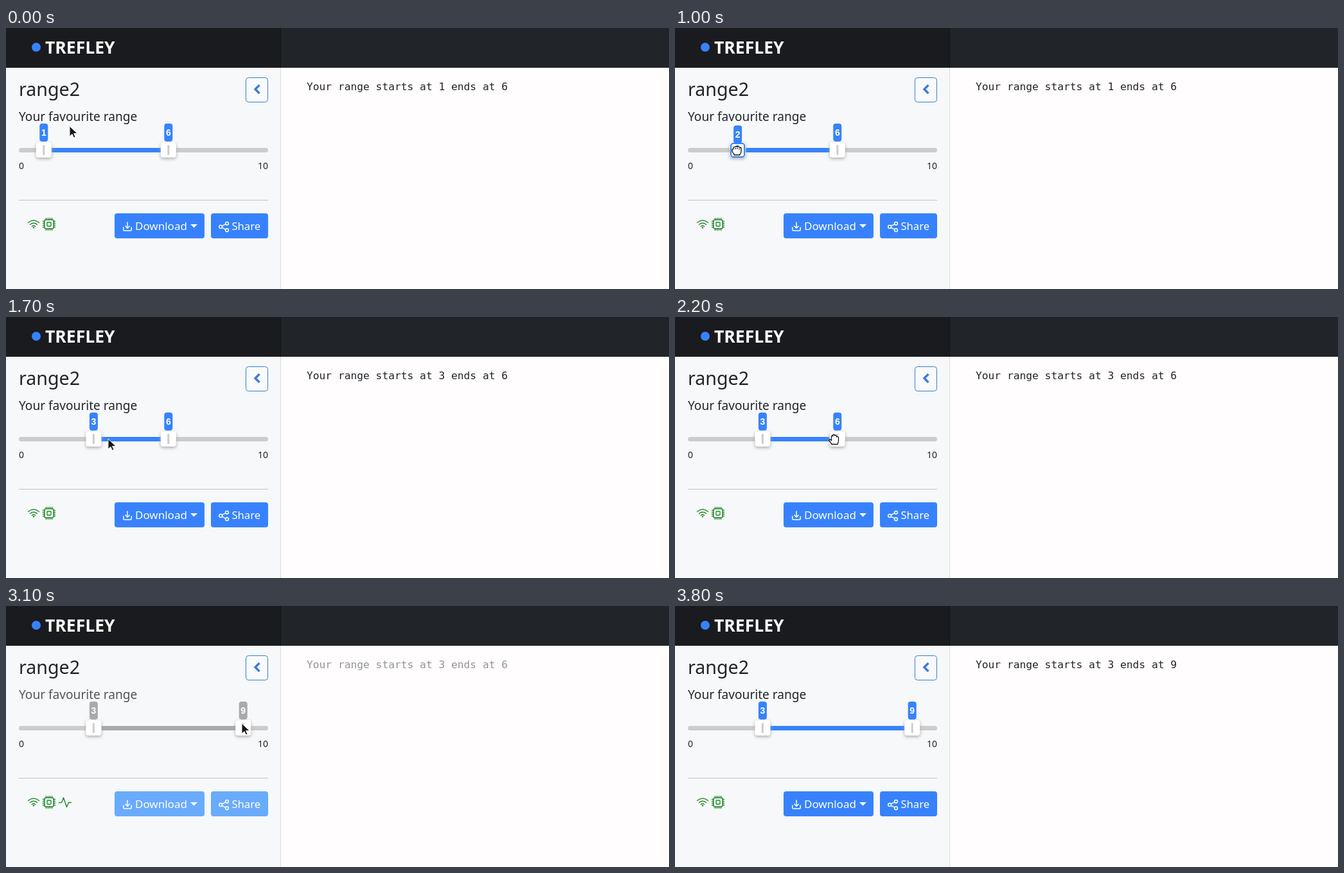
Animation, 1032 px wide and 407 px high, one loop 4400 ms. Source, as an HTML page:

```html
<!DOCTYPE html>
<html lang="en">
<head>
<meta charset="utf-8">
<title>Range slider</title>
<style>
  html, body { margin: 0; width: 100%; height: 100%; overflow: hidden; background: #fffdfe; }
  svg { display: block; font-family: "Noto Sans", sans-serif; fill: #212529; }
  .line { fill: none; stroke-linecap: round; stroke-linejoin: round; }
  .green { stroke: #22892a; stroke-width: 1.4; }
  .white { stroke: #fff; stroke-width: 1.5; }
  .thumb { fill: #fff; filter: drop-shadow(0 2px 2.5px #aaa); }
  .value { font: bold 14px "Liberation Sans", sans-serif; fill: #fff; text-anchor: middle; }
  .mono { font: 16.25px "DejaVu Sans Mono", monospace; }
  .hand { fill: #fff; stroke: #111; stroke-width: 1.3; stroke-linejoin: round; }
</style>
</head>
<body>
<svg width="1032" height="407" viewBox="0 0 1032 407">
  <rect width="1032" height="407" fill="#fffdfe"/>
  <rect y="62" width="427" height="345" fill="#f6f8fa"/>
  <rect x="427" y="62" width="1" height="345" fill="#dcdee0"/>
  <rect width="1032" height="62" fill="#212529"/>
  <rect width="428" height="62" fill="#191b1e"/>
  <rect x="427" width="1" height="62" fill="#121518"/>
  <circle cx="47" cy="30" r="7" fill="#3782fc"/>
  <text x="61" y="40" font-size="26.5" font-weight="600" fill="#fff">TREFLEY</text>

  <text x="20" y="106" font-size="28.6" font-weight="500">range2</text>
  <rect x="373.5" y="77.500" width="34" height="38" rx="4" fill="#f8fafc" stroke="#3b7fc4"/>
  <path class="line" d="M394.500 89L388 95.500L394.500 102" stroke="#3c78dc" stroke-width="3.4" style="stroke-linecap:butt;stroke-linejoin:miter"/>
  <text id="caption" x="20" y="145" font-size="19.1">Your favourite range</text>

  <rect x="20" y="187" width="388" height="7" rx="3.500" fill="#ccc"/>
  <rect id="span" y="187" height="7"/>
  <g id="low"></g>
  <g id="high"></g>
  <text x="20" y="220" font-size="14">0</text>
  <text x="408" y="220" font-size="14" text-anchor="end">10</text>
  <rect x="20" y="268" width="388" height="1" fill="#c1c3c5"/>

  <g class="line green">
    <path d="M34.500 303.500Q43 296.500 51.500 303.500M37.500 306.500Q43 302 48.500 306.500M40.300 309.300Q43 307.300 45.700 309.300"/>
    <circle cx="43" cy="311.300" r=".6"/>
    <rect x="60" y="299" width="14" height="14" rx="2"/>
    <rect x="64" y="303" width="6" height="6" rx="1"/>
    <path d="M62.500 299v-2.500m3 2.500v-2.500m3 2.500v-2.500m3 2.500v-2.500M62.500 313v2.500m3-2.500v2.500m3-2.500v2.500m3-2.500v2.500M60 301.500h-2.500m2.500 3h-2.500m2.500 3h-2.500m2.500 3h-2.500M74 301.500h2.500m-2.500 3h2.500m-2.500 3h2.500m-2.500 3h2.500"/>
    <path id="pulse" d="M82.500 306.500H86.500L89.500 299L94.500 313.500L97.500 306.500H101.500"/>
  </g>

  <g id="buttons">
    <rect x="169" y="289" width="140" height="39" rx="4"/>
    <rect x="319" y="289" width="89" height="39" rx="4"/>
  </g>
  <g class="line white">
    <path d="M182.800 311V314.500Q182.800 316 184.300 316H193.700Q195.200 316 195.200 314.500V311M189 303V312M185.800 309L189 312.200L192.200 309"/>
    <path d="M336.500 308.700L341.800 305.800M336.500 311.300L341.800 314.200"/>
    <circle cx="334.200" cy="310" r="2.400"/>
    <circle cx="344" cy="304.800" r="2.400"/>
    <circle cx="344" cy="315.200" r="2.400"/>
  </g>
  <g fill="#fff">
    <text x="201" y="315" font-size="17">Download</text>
    <path d="M287 306H298L292.500 311.500Z"/>
    <text x="351.500" y="315" font-size="16.6">Share</text>
  </g>

  <text id="output" class="mono" x="468" y="97"></text>

  <g id="cursor">
    <path id="arrow" d="M0 0V16L4 12.500L6.500 18L9 17L6.500 11.500H12Z" fill="#15171a" stroke="#fff" stroke-width=".9"/>
    <path id="open" class="hand" d="M-4 7.500Q-5 5-8 2Q-8.500 0-7 0Q-6 0-4.500 1.500V-5Q-3.500-7-2.200-5V-7Q-.8-8.800 .5-7V-6Q2-8 3.300-5.500V-4Q5.500-5.500 6.500-3V2Q6 5 5 7.500Z"/>
    <path id="fist" class="hand" d="M-7 1V-1Q-7-2.500-5-2.500V-4Q-4.500-6-2.500-5.500Q-.5-7.500 1-5.500Q3-6.500 4.500-5Q7-5 7-2.500V1Q7 4 5 6V7H-4V5.500Q-7 3-7 1Z M-2-4v2M1-4v2M4-3.500v2"/>
  </g>
</svg>
<script>
const LOOP = 4400;
const BLUE = "#3782fc", GRAY = "#aaa";
const $ = id => document.getElementById(id);

// Each row: start time in ms, then the state that holds until the next row.
const pointer = [
  [0, "arrow", 99, 153], [400, "arrow", 86, 164], [500, "arrow", 66, 180], [600, "open", 50, 194],
  [900, "fist", 50, 194], [1000, "fist", 96, 191], [1100, "fist", 165, 192], [1200, "fist", 231, 193],
  [1300, "fist", 190, 193], [1400, "fist", 143, 193], [1500, "arrow", 150, 191], [1700, "arrow", 159, 190],
  [1800, "arrow", 210, 190], [1900, "arrow", 254, 190], [2100, "open", 243, 191], [2200, "open", 248, 191],
  [2500, "fist", 248, 191], [2600, "fist", 319, 187], [2800, "fist", 362, 186], [2900, "fist", 370, 185],
  [3000, "open", 368, 185], [3100, "arrow", 367, 183], [3600, "arrow", 335, 172], [3700, "arrow", 296, 157],
  [3800, "none", 0, 0]
];
const lowValues = [[0, 1], [1000, 2], [1100, 4], [1200, 5], [1300, 4], [1400, 3]];
const highValues = [[0, 6], [2600, 9]];

const at = (rows, t) => rows.findLast(row => row[0] <= t);
const within = (t, from, to) => t >= from && t < to;
const toX = value => 20 + 38.8 * value;

function thumb(value, held, tinted, color) {
  const x = toX(value), labelY = held ? 152 : 149;
  const border = held
    ? `<rect x="${x - 10.5}" y="180" width="21" height="21" rx="3.5" fill="#fff" stroke="${BLUE}" stroke-width="2"/>` : "";
  return `<rect class="thumb" x="${x - 12}" y="178" width="24" height="24" rx="4"/>${border}
    <rect x="${x - 1.5}" y="182.500" width="3" height="15.500" fill="${tinted ? BLUE : "#ccc"}"/>
    <rect x="${x - 6.5}" y="${labelY}" width="13" height="28" rx="4" fill="${color}"/>
    <text class="value" x="${x}" y="${labelY + 19}">${value}</text>`;
}

function draw(t) {
  const busy = within(t, 1500, 1700) || within(t, 3000, 3300);
  const low = at(lowValues, t)[1], high = at(highValues, t)[1];
  const color = busy ? GRAY : BLUE;

  $("span").setAttribute("x", toX(low));
  $("span").setAttribute("width", toX(high) - toX(low));
  $("span").style.fill = color;
  $("low").innerHTML = thumb(low, within(t, 900, 1500), within(t, 900, 1400), color);
  $("high").innerHTML = thumb(high, within(t, 2500, 3000), within(t, 2500, 3000), color);

  $("caption").style.fill = busy ? "#555" : "#212529";
  $("buttons").style.fill = busy ? "#69abfc" : BLUE;
  $("pulse").style.display = busy ? "" : "none";
  $("output").style.fill = busy ? "#929496" : "#212529";
  $("output").textContent = `Your range starts at ${t < 1700 ? 1 : 3} ends at ${t < 3300 ? 6 : 9}`;

  const [, shape, x, y] = at(pointer, t);
  $("cursor").setAttribute("transform", `translate(${x} ${y})`);
  for (const id of ["arrow", "open", "fist"]) $(id).style.display = id === shape ? "" : "none";
}

const start = performance.now();
function tick() {
  draw((performance.now() - start) % LOOP);
  requestAnimationFrame(tick);
}
tick();
</script>
</body>
</html>
```
